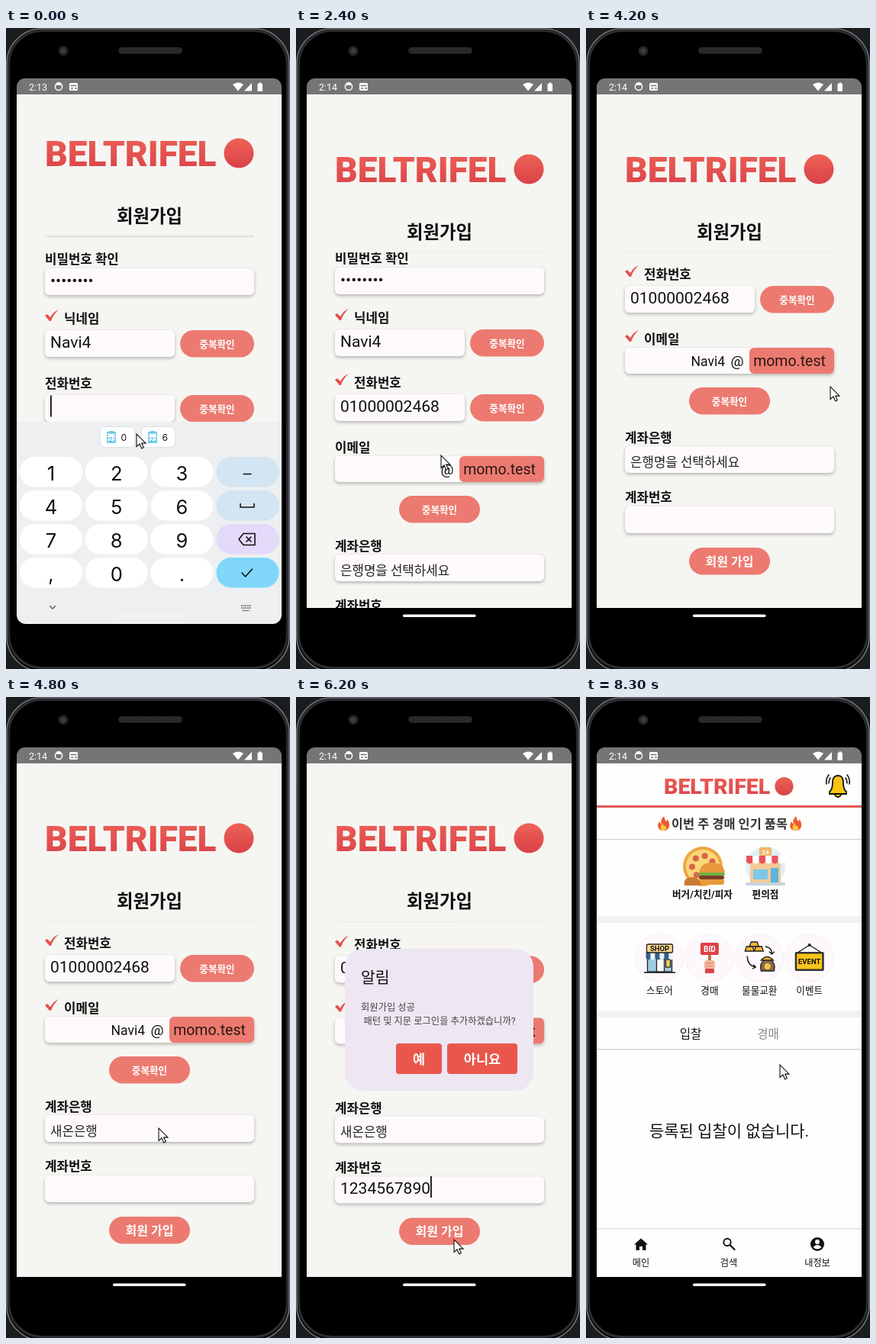
Animation of 372x840 px, one loop 8.4 s. Source, as an HTML page:

```html
<!DOCTYPE html>
<html lang="ko">
<head>
<meta charset="utf-8">
<title>회원가입</title>
<style>
  html, body { margin: 0; width: 100%; height: 100%; overflow: hidden; background: #1b1c1e; }
  svg { display: block; width: 372px; height: 840px; }
  text { font-family: Roboto, "Noto Sans CJK KR", "Noto Sans CJK", sans-serif; white-space: pre; }
  #num text, #abc text { font-family: Inter, sans-serif; }
  .field { fill: #fefafc; filter: drop-shadow(0 2px 2px #0004); }
  .btn { fill: #ec7a70; }
  .btn.down { fill: #d0706a; }
  .line { fill: none; stroke: #111; stroke-width: 1.6; stroke-linecap: round; stroke-linejoin: round; }
</style>
</head>
<body>
<svg id="stage" viewBox="0 0 372 840"></svg>
<script>
const LOOP = 8400;
const stage = document.getElementById('stage');
const $ = id => document.getElementById(id);

// Drawing helpers
const box = (x, y, w, h, r, fill, more = '') =>
  `<rect x="${x}" y="${y}" width="${w}" height="${h}" rx="${r}" fill="${fill}" ${more}/>`;
const dot = (x, y, r, fill, more = '') => `<circle cx="${x}" cy="${y}" r="${r}" fill="${fill}" ${more}/>`;
const path = (d, fill = 'none', more = '') => `<path d="${d}" fill="${fill}" ${more}/>`;
const line = (d, more = '') => `<path class="line" d="${d}" ${more}/>`;
const label = (x, y, size, str, { fill = '#111', weight = 400, anchor = 'start', id = '' } = {}) =>
  `<text x="${x}" y="${y}" font-size="${size}" fill="${fill}" font-weight="${weight}" text-anchor="${anchor}" id="${id}">${str}</text>`;
const mid = (x, y, size, str, opts = {}) => label(x, y, size, str, { ...opts, anchor: 'middle' });
const group = (id, body, more = '') => `<g id="${id}" ${more}>${body}</g>`;
const at = (x, y, body, scale = 1) => `<g transform="translate(${x} ${y}) scale(${scale})">${body}</g>`;
const field = (y, h = 35, w = 274) => `<rect class="field" x="51" y="${y}" width="${w}" height="${h}" rx="6"/>`;
const button = (id, x, y, w, str, size = 12.6) =>
  `<rect id="${id}" class="btn" x="${x}" y="${y}" width="${w}" height="35.5" rx="17.75"/>` +
  mid(x + w / 2, y + 18 + size * .36, size, str, { fill: '#fff', weight: 700 });
const caption = (y, str, x = 51, id = '') => label(x, y + 6, 16.8, str, { weight: 700, id });
const tick = (y, id = '') => group(id, path(`M51 ${y - 4}l3-2 4 4q5-8 11-10q-7 6-10 15h-2z`, '#e4514d'));
const caret = id => box(0, 0, 1.8, 28, 0, '#111', `id="${id}"`);

// Wordmark: text followed by a plain circle, vertically centred on y = 0
const wordmark = label(0, 16.5, 46, 'BELTRIFEL', { fill: 'url(#red)', weight: 900 }) + dot(254, 0, 19.5, 'url(#red)');

function phoneBody() {
  return box(0, 0, 372, 840, 0, '#1b1c1e') +
    box(1, 1, 370, 842, 46, '#000', 'stroke="#77787d" stroke-width="1.6"') +
    box(3.5, 3.5, 365, 835, 44, '#000', 'stroke="#2c2d31" stroke-width="3"') +
    dot(75, 30, 6.5, '#232426') + dot(75, 30, 3.5, '#3b3c40') +
    box(147, 25, 84, 9, 4.5, '#202122') + box(148, 26, 82, 7, 3.5, 'url(#mesh)');
}

function statusBar() {
  return path('M14 87V77a11 11 0 0 1 11-11H350a11 11 0 0 1 11 11V87z', '#757575') +
    label(30, 81.5, 12.5, '', { fill: '#fff', id: 'clock' }) +
    dot(69, 77, 4.6, 'none', 'stroke="#fff" stroke-width="1.5"') + path('M65 75a4 4 0 0 1 8 0z', '#fff') +
    box(83, 72, 11, 10, 1.5, '#fff') + path('M84.5 75.5h8M85 79h3M90 79h3', 'none', 'stroke="#757575" stroke-width="1.4"') +
    path('M297 74q7.500-5 14 0l-7 8.500z', '#fff') + path('M312 82.500l10-10.500v10.500z', '#fff') +
    path('M329.500 73h2v-1.500h3v1.500h1.500v10h-6.500z', '#fff');
}

// Rows are placed relative to the phone label (y = 0)
function formRows() {
  return caption(-163, '비밀번호 확인') + field(-151) + label(58, -128.5, 21, '••••••••') +
    tick(-85) + caption(-85, '닉네임', 76) + field(-70, 35, 170) + label(58, -47, 21, 'Navi4') +
    button('', 228, -70, 97, '중복확인') +
    tick(0, 'phoneTick') + caption(0, '전화번호', 51, 'phoneLabel') + field(15, 35, 170) +
    label(58, 37.5, 21, '', { id: 'phone' }) + caret('phoneCaret') + button('phoneBtn', 228, 15, 97, '중복확인') +
    tick(85, 'mailTick') + caption(85, '이메일', 51, 'mailLabel') + field(96, 34) +
    label(182, 120, 17.5, '', { anchor: 'end', id: 'mail' }) + box(0, 123, 0, 1.2, 0, '#111', 'id="mailLine"') + caret('mailCaret') +
    mid(198, 120, 19, '@') + box(214, 96, 111, 34, 6, '#ec7a70') + mid(266.5, 120, 19.5, 'momo.test', { fill: '#2c1714' }) +
    button('mailBtn', 135, 148, 106, '중복확인') +
    caption(214, '계좌은행') + field(225) + label(58, 251.5, 16.8, '', { fill: '#222', id: 'bank' }) +
    caption(292, '계좌번호') + field(304) + label(58, 326, 21, '', { id: 'account' }) + caret('accountCaret') +
    button('joinBtn', 135, 358, 106, '회원 가입', 16);
}

function signUp() {
  return box(14, 87, 347, 673, 0, '#f5f5f2') + group('pan',
    at(51, 164, wordmark) + mid(188, 254.5, 23.4, '회원가입', { weight: 700 }) +
    box(51, 272, 274, 3, 0, 'url(#rule)', 'id="divider"') +
    `<g clip-path="url(#formClip)">${group('rows', formRows())}</g>`);
}

const clipIcon = (x, numeric) => at(x, 528,
  path('M2 2h10v13H2z', '#fff', 'stroke="#72c9ea" stroke-width="1.8"') + box(4, 0, 6, 4, 1, '#72c9ea') +
  (numeric ? box(0, 7, 16, 6, 0, '#fff') + label(0, 13.5, 8, '123', { fill: '#4bb9e6', weight: 700 })
           : line('M5 7h4M5 9.500h4M5 12h4', 'style="stroke:#72c9ea;stroke-width:1.2"')));
const chip = (x, w, str, numeric = true) => box(x, 522.5, w, 27, 7, '#fff', 'stroke="#dedfe0"') +
  clipIcon(x + 8, numeric) + label(x + 27.5, 541, 12, str);
const backspace = (x, y) => at(x, y, line('M-11 0l6-7.500h15v15h-15zM-1-3l6 6M5-3l-6 6'));
const check = (x, y) => line(`M${x - 7} ${y}l4.500 5 9-10`);
const padBase = box(14, 516, 347, 265, 0, '#eeeff0') + line('M57.500 757.500l3.500 3.500 3.500-3.500', 'style="stroke:#555;stroke-width:1.2"') +
  path('M308 757h13M308 760h13M310 763.500h9', 'none', 'stroke="#555" stroke-width="1.7" stroke-dasharray="1.700 1"');

function numberPad() {
  const sideColors = ['#d3e4f2', '#d3e4f2', '#e3d9f8', '#80d7fa'];
  const rows = ['123', '456', '789', ',0.'].map((keys, r) => {
    const y = 562 + 44 * r;
    return [...keys].map((k, c) => box(18 + 85.7 * c, y, 82, 39.5, 19.5, '#fff') +
      mid(59 + 85.7 * c, y + 30.5, 25.5, k)).join('') + box(275.5, y, 82, 39.5, 19.5, sideColors[r]);
  }).join('');
  return padBase + chip(123, 46, '0') + chip(177, 45, '6') + rows +
    line('M311 584.500h10M307 623.500v4.500h18v-4.500') + backspace(316, 670) + check(316, 714);
}

function letterPad() {
  const pitch = 34.2;
  const keyRow = (keys, x0, y, hint) => [...keys].map((k, i) => {
    const x = x0 + pitch * i;
    return box(x, y, 30.5, 37, 6, '#fff') + mid(x + 15, y + 25.5, 20, k) +
      (hint ? mid(x + 26, y + 10, 8.5, (i + 1) % 10, { fill: '#444' }) : '');
  }).join('');
  const blue = '#d3e4f2';
  return padBase + dot(35, 535.5, 13.5, '#80d7fa') + line('M33 531l4.500 4.500-4.500 4.500') +
    chip(68, 126, '0 6 10:57:21 DE', false) + chip(202, 47, '0') + chip(256, 46, '6') +
    path('M315 523h-1q-4 0-4 6v15q0 6 4 6h1', '#fff', 'stroke="#dedfe0"') +
    box(338, 527, 5, 10, 2.5, '#111') + line('M335 534q0 6 5.500 6t5.500-6M340.500 540v4') +
    keyRow('qwertyuiop', 18, 562, true) + keyRow('asdfghjkl', 35, 607) + keyRow('zxcvbnm', 69, 652) +
    box(18, 652, 47, 37, 6, blue) + line('M41 661l9 9h-5v7h-8v-7h-5z') +
    box(309, 652, 48, 37, 6, blue) + backspace(333, 670) +
    box(18, 696, 47, 37, 18.5, '#b6c9d3') + mid(41.5, 720, 12.5, '?123') +
    box(69, 696, 30.5, 37, 6, blue) + dot(84, 707, 4.5, 'none', 'stroke="#222"') +
    path('M82 708.500q2 2 4 0M82 705.500h.8M85.300 705.500h.8', 'none', 'stroke="#222"') + mid(84, 725, 18, ',') +
    box(103, 696, 30.5, 37, 6, '#fff') + line('M110 714.500a8.500 8.500 0 1 0 17 0a8.500 8.500 0 1 0-17 0h17M111.500 710h14M111.500 719h14M118.500 706q-8 8.500 0 17q8-8.500 0-17', 'style="stroke-width:1.2"') +
    box(137, 696, 134, 37, 6, '#fff') + mid(204, 719, 11.3, 'Elvanic') +
    box(275, 696, 30.5, 37, 6, blue) + mid(290, 721, 20, '.') + box(309, 696, 48, 37, 18.5, '#80d7fa') + check(333, 714.5);
}

function dialog() {
  const action = (x, w, str) => box(x, 454, w, 40, 4, '#e9574c') + mid(x + w / 2, 480.5, 17.5, str, { fill: '#fff', weight: 700 });
  return box(64, 330, 247, 186, 24, '#eee6f2') + label(85, 375, 20.5, '알림') +
    label(85, 410.5, 12.3, '회원가입 성공', { fill: '#444' }) +
    label(88.5, 428.5, 12.3, '패턴 및 지문 로그인을 추가하겠습니까?', { fill: '#444' }) +
    action(131, 60, '예') + action(198, 92, '아니요');
}

const flame = x => at(x, 166,
  path('M0 9C-8 9-9 1-5-3q0 3 2 3Q-4-6 1-10Q1-5 4-3q1-1 1-3C10 1 8 9 0 9z', '#f0582f') +
  path('M0 9c-5 0-5-6-1-10q0 4 3 4c3 2 2 6-2 6z', '#ffc83d'));

const awning = (w, y, a, b) => Array.from({ length: 6 }, (_, i) =>
  path(`M${-w + i * w / 3} ${y}h${w / 3}v8q${-w / 6} 5 ${-w / 3} 0z`, i % 2 ? b : a)).join('');

function icons() {
  const pizza = dot(0, 0, 26, '#eda544') + dot(0, 0, 22, '#fbd777') +
    [0, 1, 2, 3, 4].map(i => dot(14 * Math.cos(2.2 + i * .9), 14 * Math.sin(2.2 + i * .9), 4, '#d9644a')).join('') +
    path('M-5 8q2-13 17-13t17 13z', '#e89a3c') + box(-6, 8, 35, 4, 2, '#72b043') + box(-5, 12, 33, 5, 2, '#7a3f24') +
    box(-5, 17, 33, 7, 3, '#e89a3c') + path('M-24 25q-2-10 9-11t13 11z', '#c97a32');
  const mart = dot(0, 0, 26, '#dff0f7') + box(-20, -6, 40, 28, 0, '#f3c998') + box(-16, 4, 19, 13, 0, '#7cc8e8') +
    box(7, 2, 10, 20, 0, '#5eb3dc') + box(-8, -25, 16, 11, 2, '#f3b767') + mid(0, -16, 8, '24', { fill: '#fff', weight: 700 }) +
    awning(25, -14, '#e9535a', '#fff') + box(-26, 21, 52, 4, 1, '#c9d3d9');
  const ink = 'stroke="#222" stroke-width="1.3"';
  const shop = box(-16, -4, 32, 22, 0, '#9ecbe2', ink) + box(-4, 1, 10, 17, 0, '#fff', ink) + box(8, 2, 6, 10, 0, '#f2cf67', ink) +
    awning(18, -8, '#31608f', '#eef3f6') + box(-17, -18, 34, 11, 2, '#f6d58a', ink) + mid(0, -9, 9.5, 'SHOP', { weight: 700 }) + line('M-20 19h40');
  const bid = box(-2, -5, 4, 12, 0, '#b87946') + box(-12, -20, 24, 16, 2, '#dd3f45') + mid(0, -8.5, 10, 'BID', { fill: '#fff', weight: 700 }) +
    box(-7, 3, 14, 12, 4, '#f4b79b') + line('M-5 7h9M-5 11h9', 'style="stroke:#cf8d72;stroke-width:1"') + box(-6, 14, 12, 6, 1, '#d64348');
  const ingot = (x, y) => path(`M${x - 6} ${y}l2-6h8l2 6z`, '#f2b632', ink);
  const swap = ingot(-13, -9) + ingot(-7, -15) + ingot(-1, -9) + path('M2 17q-3-10 5-15h7q8 5 5 15z', '#8b6748', ink) +
    path('M2 3q8-9 16 0z', '#f2b632', ink) + dot(10.5, 11, 4, '#f2c64b') +
    line('M8-15q9 2 8 10l-3-3M16-5l3-3M-16-2q0 12 11 14l-3-3M-5 12l-4 2', 'style="stroke-width:1.3"');
  const event = line('M-14-8l14-9 14 9', 'style="stroke-width:1.2"') + dot(0, -17, 2, '#222') + box(-19, -8, 38, 25, 2, '#333') +
    box(-16.5, -5.5, 33, 20, 0, '#fac51c') + mid(0, 8, 9.5, 'EVENT', { weight: 700 });
  return { pizza, mart, shop, bid, swap, event };
}

function home() {
  const art = icons();
  const menu = [['shop', '스토어'], ['bid', '경매'], ['swap', '물물교환'], ['event', '이벤트']].map(([key, name], i) => {
    const x = 96.5 + 65.4 * i;
    return dot(x, 342, 31.5, '#fdf8fb', 'stroke="#f8f0f5"') + at(x, 342, art[key]) + mid(x, 388.5, 12.6, name);
  }).join('');
  const bell = path('M-11 8q4-3 4-12q0-9 7-9t7 9q0 9 4 12v3h-22z', '#fbc415', 'stroke="#111" stroke-width="1.8"') +
    path('M-4 11a4 4 0 0 0 8 0z', '#fbc415', 'stroke="#111" stroke-width="1.8"') +
    line('M-10-10q-2 3-2 7M10-10q2 3 2 7M-12-14q-4 5-3 12M12-14q4 5 3 12');
  return box(14, 87, 347, 673, 0, '#fefefc') + at(102, 117, wordmark, .62) + at(330, 116, bell) +
    box(14, 142, 347, 3, 0, '#e25a54') + flame(101.5) + flame(274.5) +
    mid(188, 172, 16.4, '이번 주 경매 인기 품목', { fill: '#333', weight: 700 }) +
    box(14, 186, 347, 1, 0, '#c9cbd0') + at(153, 222, art.pizza) + at(235, 222, art.mart) +
    mid(152.5, 263, 12.6, '버거/치킨/피자', { weight: 700 }) + mid(235, 263, 12.6, '편의점', { weight: 700 }) +
    box(14, 287, 347, 9, 0, '#f2f2f1') + menu + box(14, 411, 347, 9, 0, '#f2f2f1') +
    mid(137, 447, 15.6, '입찰') + mid(238.5, 447, 15.6, '경매', { fill: '#8b8b8b' }) + box(14, 461, 347, 1.5, 0, '#d3d5d9') +
    mid(187.5, 575.5, 21, '등록된 입찰이 없습니다.') + box(14, 696, 347, 1.5, 0, '#e0e0e0') +
    path('M63 717.500l9-8 9 8h-2.500v7.500h-4.500v-5h-4v5h-4.500v-7.500z', '#111') +
    dot(185, 714.5, 4.7, 'none', 'stroke="#111" stroke-width="1.9"') + line('M189 718.500l5.500 5.500', 'style="stroke-width:2.2"') +
    dot(303, 717, 9, '#111') + dot(303, 714, 3, '#fff') + path('M297.500 721q5.500-6 11 0q-5.500 5-11 0z', '#fff') +
    mid(72, 745.5, 12.2, '메인') + mid(187, 745.5, 12.2, '검색') + mid(303, 745.5, 12.2, '내정보');
}

stage.innerHTML = `<defs>
  <linearGradient id="red" x2="0" y2="1"><stop stop-color="#ee6256"/><stop offset="1" stop-color="#d94148"/></linearGradient>
  <linearGradient id="rule" x2="0" y2="1"><stop stop-color="#d9d9d6"/><stop offset="1" stop-color="#f2f2ef"/></linearGradient>
  <pattern id="mesh" width="3" height="3" patternUnits="userSpaceOnUse"><path d="M0 0l3 3M3 0l-3 3" stroke="#343536" stroke-width=".7"/></pattern>
  <clipPath id="formClip"><rect x="14" y="273" width="347" height="700"/></clipPath>
  <clipPath id="pageClip"><rect x="14" y="87" width="347" height="673"/></clipPath>
  <clipPath id="padClip"><path d="M14 500H361V769a12 12 0 0 1-12 12H26a12 12 0 0 1-12-12z"/></clipPath>
</defs>` + phoneBody() +
  `<g clip-path="url(#pageClip)">${group('signUp', signUp())}${group('home', home())}</g>` + statusBar() +
  `<g clip-path="url(#padClip)">${group('num', numberPad())}${group('abc', letterPad())}</g>` +
  box(140, 768.5, 95.5, 3.5, 1.75, '#fff', 'id="pill"') + group('dialog', dialog()) +
  group('mouse', path('M0 0v16.500l4-3.500 2.700 6 2.600-1.200-2.600-5.700h5.300z', '#fff', 'stroke="#111" stroke-width="1.1"'));

// [time, keyboard, page pan, form offset]
const SCENES = [
  [0, 'num', 0, 466], [2300, '', 21, 487], [2400, '', 21, 465], [2500, '', 21, 443],
  [2600, 'abc', -30, 392], [3100, '', 21, 443], [3200, '', 21, 380], [3300, '', 21, 323],
  [3600, 'abc', 21, 323], [3900, '', 21, 323], [5200, 'num', -126, 178.5], [5800, '', 21, 324.5]
];
// [time, x, y]
const POINTER = [
  [0, 171, 532], [1600, 171, 532], [1800, 270, 506], [1900, 270, 526], [2000, 270, 526], [2200, 53, 772],
  [2300, 53, 772], [2400, 190, 560], [2500, 190, 490], [2600, 120, 495], [2900, 53, 772], [3100, 53, 772],
  [3300, 185, 485], [3400, 185, 485], [3500, 160, 432], [3700, 160, 432], [3800, 53, 772], [3900, 53, 772],
  [4000, 185, 485], [4200, 320, 470], [4400, 320, 470], [4700, 200, 565], [5000, 200, 565], [5100, 150, 640],
  [5300, 150, 640], [5600, 53, 772], [5800, 53, 772], [6000, 207, 711], [6300, 207, 711], [6500, 254, 482], [LOOP, 254, 482]
];

const during = (t, a, b) => t >= a && t < b;
const ramp = (t, a, b) => Math.min(1, Math.max(0, (t - a) / (b - a)));
const typed = (str, t, a, b) => str.slice(0, Math.round(str.length * ramp(t, a, b)));
const show = (id, on) => { $(id).style.display = on ? '' : 'none'; };
const write = (id, str) => { if ($(id).textContent !== str) $(id).textContent = str; };
const press = (id, on) => $(id).classList.toggle('down', on);
const move = (id, x, y) => $(id).setAttribute('transform', `translate(${x} ${y})`);

function pointerAt(t) {
  const i = POINTER.findIndex(p => p[0] > t);
  const [t0, x0, y0] = POINTER[i - 1], [t1, x1, y1] = POINTER[i];
  const k = ramp(t, t0, t1);
  return [x0 + (x1 - x0) * k, y0 + (y1 - y0) * k];
}

function placeCaret(id, textId, y, on) {
  show(id, on);
  if (on) move(id, 58 + $(textId).getComputedTextLength(), y);
}

function verified(name, on) {
  show(name + 'Tick', on);
  $(name + 'Label').setAttribute('x', on ? 76 : 51);
}

function render(now) {
  const t = Math.floor(now % LOOP / 100) * 100;
  const [, pad, pan, offset] = SCENES.filter(s => s[0] <= t).pop();
  const atHome = t >= 6800;

  show('signUp', !atHome);
  show('home', atHome);
  show('dialog', during(t, 6100, 6600));
  show('num', pad === 'num');
  show('abc', pad === 'abc');
  $('pill').setAttribute('fill', !pad ? '#fff' : t < 200 ? '#f3f3f3' : '#5a5a5c');
  $('divider').setAttribute('opacity', t < 2300 ? 1 : .25);
  write('clock', t < 2300 ? '2:13' : '2:14');
  move('pan', 0, pan);
  move('rows', 0, offset - pan);
  move('mouse', ...pointerAt(t));

  write('phone', typed('0100000', t, 0, 600) + typed('2468', t, 1000, 1500));
  placeCaret('phoneCaret', 'phone', 15.5, t < 1700);
  verified('phone', t >= 1900);
  press('phoneBtn', during(t, 1800, 2000));

  write('mail', t < 3600 ? typed('Navi58', t, 2600, 2900) : typed('Navi4', t, 3600, 3800));
  const editingMail = pad === 'abc';
  const mailWidth = editingMail && $('mail').textContent ? $('mail').getComputedTextLength() : 0;
  $('mailLine').setAttribute('x', 182 - mailWidth);
  $('mailLine').setAttribute('width', mailWidth);
  show('mailCaret', editingMail);
  move('mailCaret', 181, 101);
  verified('mail', t >= 4100);
  press('mailBtn', during(t, 3400, 3500) || during(t, 4000, 4100));

  write('bank', t < 4800 ? '은행명을 선택하세요' : '새온은행');
  write('account', typed('1234567890', t, 5200, 5600));
  placeCaret('accountCaret', 'account', 303.5, t >= 5200);
  press('joinBtn', during(t, 6000, 6200));
}

const start = performance.now();
function tickFrame() {
  render(performance.now() - start);
  requestAnimationFrame(tickFrame);
}
tickFrame();
</script>
</body>
</html>
```
